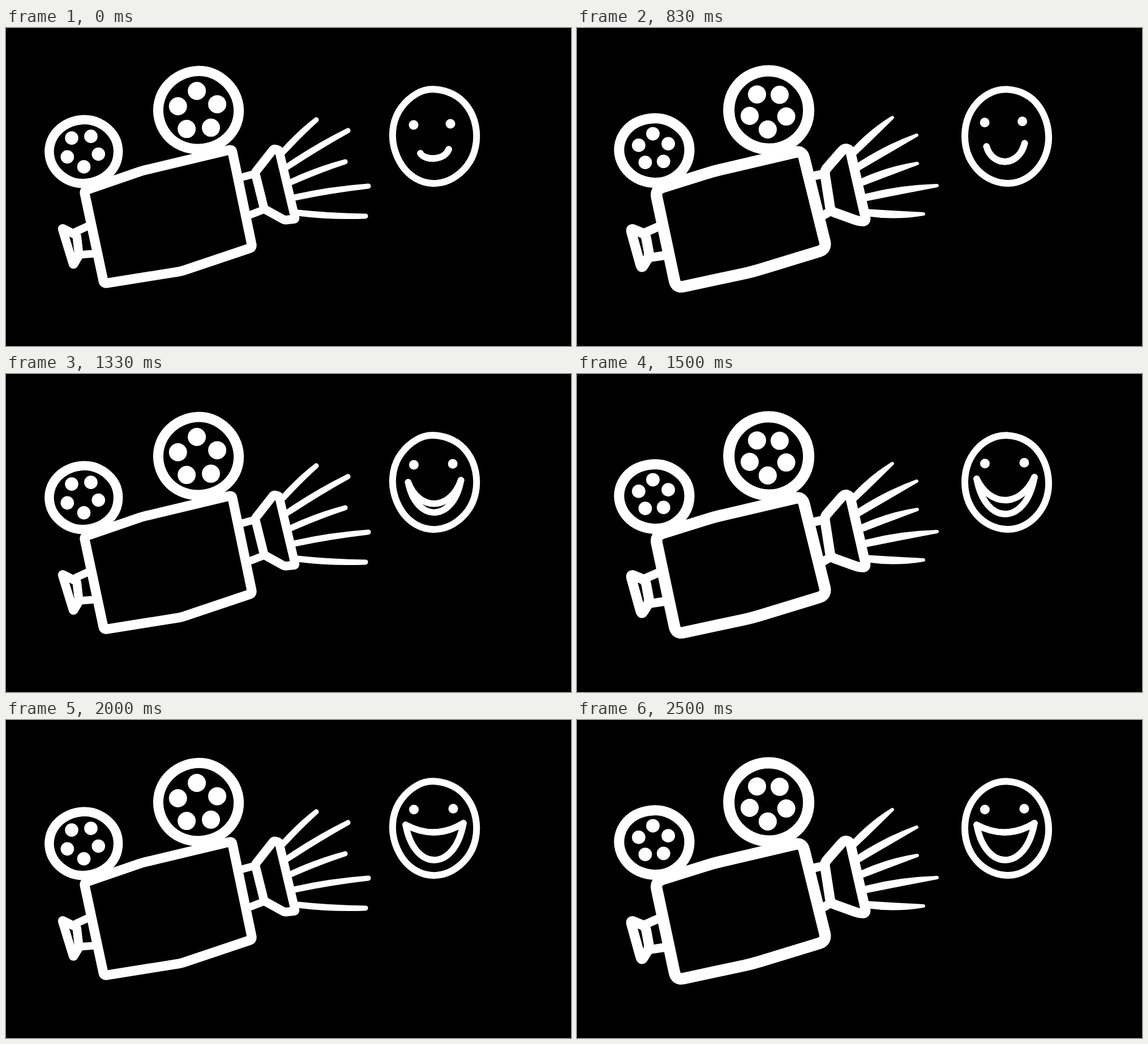
These frames come from a looping animation (998 by 561 pixels, 2660 ms). An HTML page:

```html
<!DOCTYPE html>
<html lang="en">
<head>
<meta charset="utf-8">
<title>Projector and smile</title>
<style>
html, body { margin: 0; width: 100%; height: 100%; overflow: hidden; background: #000; }
svg { display: block; width: 100vw; height: 100vh; }
path { stroke-linecap: round; stroke-linejoin: round; }
</style>
</head>
<body>
<svg id="stage" viewBox="0 0 998 561" fill="none" stroke="#fff"></svg>
<script>
const LOOP = 2660, STEPS = 16;
const stage = document.getElementById('stage');

const mix = (a, b, t) => a + (b - a) * t;
const mixPt = (p, q, t) => p.map((v, i) => mix(v, q[i], t));
const ramp = (v, from, to) => Math.max(0, Math.min(1, (v - from) / (to - from)));
const dist = (p, q) => Math.hypot(q[0] - p[0], q[1] - p[1]);

function random(seed) {
  return () => (seed = (seed * 16807) % 2147483647) / 2147483647;
}

function add(parent, tag, attrs) {
  const el = document.createElementNS('http://www.w3.org/2000/svg', tag);
  for (const k in attrs) el.setAttribute(k, attrs[k]);
  return parent.appendChild(el);
}

const stroke = (g, d, w) => add(g, 'path', { d, 'stroke-width': w });
const dot = (g, cx, cy, r) => add(g, 'circle', { cx, cy, r, fill: '#fff', stroke: 'none' });

// Closed outline whose corners are rounded by r
function outline(pts, r) {
  const n = pts.length;
  return pts.map((p, i) => {
    const near = q => mixPt(p, q, Math.min(.5, r / dist(p, q)));
    return `${i ? 'L' : 'M'}${near(pts[(i + n - 1) % n])}Q${p} ${near(pts[(i + 1) % n])}`;
  }).join('') + 'Z';
}

// Slightly uneven hand-drawn ellipse
function blob(g, cx, cy, rx, ry, w, rnd) {
  const n = 14, pts = [];
  for (let i = 0; i < n; i++) {
    const a = i / n * 2 * Math.PI, k = 1.012 + (rnd() - .5) * .024;
    pts.push([cx + rx * k * Math.cos(a), cy + ry * k * Math.sin(a)]);
  }
  stroke(g, outline(pts, 99), w);
}

// Film reel: rim and five holes turned by an angle in degrees
function reel(g, { rim, hub, turn }, w, rnd) {
  blob(g, ...rim, w, rnd);
  const [x, y, dist, r] = hub;
  for (let i = 0; i < 5; i++) {
    const a = (turn + i * 72) * Math.PI / 180;
    dot(g, x + dist * Math.cos(a), y + dist * Math.sin(a), r);
  }
}

// Light beam that levels out and narrows toward its tip
function beam(g, from, tip, w0, w1) {
  const len = dist(from, tip), half = (w0 - w1) / 2;
  const n = [(from[1] - tip[1]) / len * half, (tip[0] - from[0]) / len * half];
  const bend = mixPt(from, tip, .5);
  bend[1] += Math.sign(tip[1] - from[1]) * 4;
  const off = (p, k) => [p[0] + n[0] * k, p[1] + n[1] * k];
  const d = `M${off(from, 1)}Q${off(bend, 1.5)} ${tip}Q${off(bend, -1.5)} ${off(from, -1)}Z`;
  stroke(g, d, w1).setAttribute('fill', '#fff');
}

const poses = [
  {
    seed: 11, round: 5, bodyWidth: 17, partWidth: 15.5, reelWidths: [16.5, 18], beamWidths: [11, 9],
    small: { rim: [137.5, 218, 62, 57], hub: [135, 216, 29, 11.8], turn: 85 },
    big: { rim: [340, 145, 72, 70], hub: [339, 147.5, 36.5, 16], turn: 267 },
    body: [[138, 287], [240, 252], [399, 214], [435, 387], [310, 429], [173, 451]],
    lens: [[473, 213], [440, 255], [456, 319], [492, 339], [511, 337], [482, 215]],
    crank: [[99, 353], [125, 366], [129, 401], [119, 418]],
    bars: [[[414, 264], [440, 257]], [[433, 329], [456, 320]], [[124, 359], [148, 348]], [[130, 400], [157, 398]]],
    tips: [[548, 162], [604, 181], [599, 236], [640, 279], [635, 332]],
    face: [757, 191, 75, 84]
  },
  {
    seed: 47, round: 14, bodyWidth: 20.5, partWidth: 17.5, reelWidths: [18, 20], beamWidths: [13, 6],
    small: { rim: [137, 216, 63, 58], hub: [135.5, 214, 27.5, 11.9], turn: 267 },
    big: { rim: [338.5, 145, 71.5, 70], hub: [337.5, 145, 34, 16], turn: 91 },
    body: [[138, 285], [240, 253], [398, 216], [441, 390], [310, 430], [175, 459]],
    lens: [[472, 212], [437, 252], [448, 323], [498, 341], [511, 341], [482, 214]],
    crank: [[94, 353], [121, 364], [128, 402], [114, 425]],
    bars: [[[418, 261], [437, 257]], [[434, 331], [450, 322]], [[122, 360], [147, 349]], [[129, 405], [156, 401]]],
    tips: [[557, 158], [600, 189], [601, 239], [636, 278], [612, 328]],
    face: [759, 191, 75, 84]
  }
];

function build(p) {
  const g = add(stage, 'g', {}), rnd = random(p.seed);
  reel(g, p.small, p.reelWidths[0], rnd);
  reel(g, p.big, p.reelWidths[1], rnd);
  stroke(g, outline(p.body, p.round), p.bodyWidth);
  stroke(g, outline(p.lens, p.round / 2), p.partWidth);
  stroke(g, outline(p.crank, p.round / 2), p.partWidth);
  p.bars.forEach(([a, b]) => stroke(g, `M${a}L${b}`, p.partWidth - 2));
  p.tips.forEach((tip, i) => beam(g, mixPt([489, 219], [515, 326], i / 4), tip, ...p.beamWidths));
  blob(g, ...p.face, 12, rnd);
  return g;
}

const views = poses.map(build);
const lips = [0, 1].map(() => stroke(stage, '', 11.5));
const eyes = [0, 1].map(() => dot(stage, 0, 0, 8.5));

// Lip from corner to corner, its middle at height y
function lip(l, r, y, inset) {
  const cy = (y - (l[1] + r[1]) / 8) * 4 / 3;
  const dx = (r[0] - l[0]) * inset;
  return `M${l}C${l[0] + dx} ${cy} ${r[0] - dx} ${cy} ${r}`;
}

function drawFace(step) {
  const smile = ramp(step, 3, 9), open = ramp(step, 6, 12);
  const l = mixPt([732, 221], [706, 185], smile);
  const r = mixPt([782, 214], [808, 182], smile);
  const low = mix(230, 247, smile);
  lips[0].setAttribute('d', lip(l, r, low, .15));
  lips[1].setAttribute('d', lip(l, r, mix(low, 198, open), mix(.15, .33, open)));
  const spots = [mixPt([720, 171], [720.5, 158], smile), mixPt([785, 169], [790, 156.5], smile)];
  eyes.forEach((el, i) => {
    el.setAttribute('cx', spots[i][0]);
    el.setAttribute('cy', spots[i][1]);
  });
}

const start = i => Math.round(i * 100 / 6) * 10;
let shown = -1;

function show(step) {
  if (step === shown) return;
  shown = step;
  views.forEach((g, i) => g.setAttribute('visibility', i === step % 2 ? 'visible' : 'hidden'));
  drawFace(step);
}

function tick() {
  const t = performance.now() % LOOP;
  let step = 0;
  while (step < STEPS - 1 && start(step + 1) <= t) step++;
  show(step);
  requestAnimationFrame(tick);
}
tick();
</script>
</body>
</html>
```
